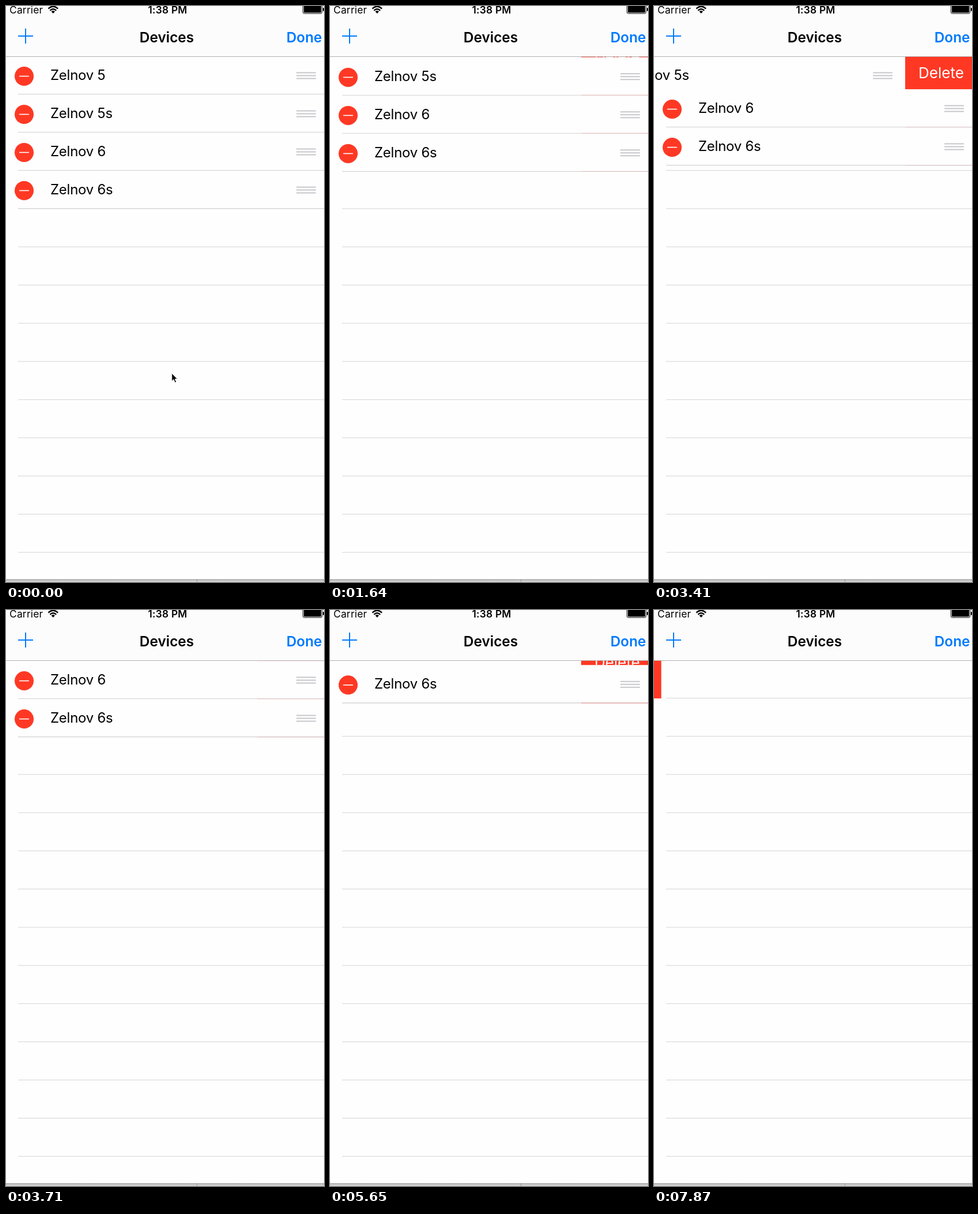
These frames come from a looping animation (552x997 px, 8 s). An HTML page:

```html
<!DOCTYPE html>
<html lang="en">
<head>
<meta charset="utf-8">
<title>Devices</title>
<style>
  html, body { margin: 0; width: 100%; height: 100%; overflow: hidden; background: #fefefe; }
  svg { display: block; width: 100vw; height: 100vh; }
  text { font-family: Inter, Roboto, sans-serif; white-space: pre; }
  .semi { font-weight: 600; }
  .status { font-size: 17.4px; letter-spacing: .2px; }
  .bar { font-size: 24.4px; }
  .label { font-size: 24px; letter-spacing: -.25px; }
</style>
</head>
<body>
<svg id="stage" viewBox="0 0 552 997">
  <defs>
    <linearGradient id="edge" x1="0" y1="0" x2="0" y2="1">
      <stop offset="0" stop-color="#a9a9a9"/>
      <stop offset="1" stop-color="#dedede"/>
    </linearGradient>
  </defs>
  <rect width="552" height="997" fill="#fefefe"/>
  <g id="lines"></g>
  <g id="rows"></g>

  <rect width="552" height="87" fill="#fcfcfc"/>
  <rect y="87" width="552" height="1" fill="#b2b2b4"/>
  <text class="status" x="6" y="13">Carrier</text>
  <g fill="none" stroke="#000" stroke-width="2.3">
    <path d="M73.4 4.6Q81.8 -3.2 90.2 4.6"/>
    <path d="M76.4 7.8Q81.8 2.6 87.2 7.8"/>
  </g>
  <path d="M78.6 9.6Q81.8 6.9 85 9.6L81.8 13Z"/>
  <text class="status semi" x="280.5" y="13" text-anchor="middle">1:38 PM</text>
  <rect x="515.5" y="-3" width="33" height="16" rx="2" fill="none" stroke="#000"/>
  <rect x="517" y="-2" width="30" height="13.5" rx="1"/>
  <rect x="550" y="3" width="2" height="6" rx="1"/>
  <path d="M21 52H47M34 39V65" stroke="#007aff" stroke-width="2"/>
  <text class="bar semi" x="279" y="63" text-anchor="middle">Devices</text>
  <text class="bar semi" x="548.5" y="63" text-anchor="end" fill="#007aff">Done</text>

  <rect y="992" width="552" height="5" fill="url(#edge)"/>
  <rect x="331" y="992" width="1" height="5" fill="#999"/>
  <path id="cursor" d="M287.8 635.5V649.5L291 646.6L293.4 652L295.8 651L293.4 645.8H297.6Z"
        stroke="#fff" stroke-width="1"/>
</svg>
<script>
const LOOP = 8000, STEP = 148.5;
const TOP = 87, ROW = 66, WIDTH = 562, SWIPE = 124;
const $ = id => document.getElementById(id);

// open / remove: tick at which each motion starts, then spring phase at that tick and its gain per tick
const devices = [
  { name: 'Zelnov 5',  open: [1, .2, 2.1],   remove: [10, 2.7, 2.7] },
  { name: 'Zelnov 5s', open: [15, .2, 2.1],  remove: [23, .64, 2.7] },
  { name: 'Zelnov 6',  open: [29, .25, 2.1], remove: [37, .9, 2.7] },
  { name: 'Zelnov 6s', open: [42, .05, 2.1], remove: [50, .3, 1.8] }
];

function add(parent, tag, attrs, text) {
  const el = document.createElementNS('http://www.w3.org/2000/svg', tag);
  for (const key in attrs) el.setAttribute(key, attrs[key]);
  if (text) el.textContent = text;
  return parent.appendChild(el);
}

function shift(el, x, y) {
  el.setAttribute('transform', `translate(${x} ${y})`);
}

for (let i = 0; i < 13; i++) {
  add($('lines'), 'rect', { x: 21, y: 152 + 66.1 * i, width: 531, height: 1, fill: '#d4d4d6' });
}

function makeRow({ name }) {
  const root = add($('rows'), 'g', {});
  const back = add(root, 'rect', { width: WIDTH, height: ROW, fill: '#fefefe' });
  const line = add(root, 'rect', { x: 21, y: 65, width: WIDTH - 21, height: 1, fill: '#d0d0d3' });
  const button = add(root, 'rect', { x: 436, width: WIDTH - 436, height: ROW, fill: '#ff3824' });
  const caption = add(root, 'text', { x: 498.5, 'text-anchor': 'middle', 'font-size': 26, fill: '#fff' }, 'Delete');
  const cell = add(root, 'g', {});
  add(cell, 'rect', { width: 560, height: 65, fill: '#fefefe' });
  add(cell, 'rect', { x: 21, y: 65, width: 539, height: 1, fill: '#d0d0d3' });
  add(cell, 'circle', { cx: 31.5, cy: 35.3, r: 16.5, fill: '#e8e8e8' });
  add(cell, 'circle', { cx: 31.5, cy: 34.5, r: 16.5, fill: '#ff3824' });
  const minus = add(cell, 'rect', { x: 23, y: 33.7, width: 17, height: 1.6, fill: '#fff' });
  add(cell, 'text', { class: 'label', x: 77, y: 41 }, name);
  for (const y of [27.4, 32.4, 37.4]) {
    add(cell, 'rect', { x: 504, y, width: 34, height: 2, rx: .6, fill: '#c7c7cc' });
  }
  return { root, button, caption, cell, minus };
}
const rows = devices.map(makeRow);

// Critically damped spring, 0 to 1
function spring(tick, [start, phase, gain]) {
  if (tick < start) return 0;
  const x = phase + gain * (tick - start);
  const p = 1 - (1 + x) * Math.exp(-x);
  return p > .998 ? 1 : p;
}

function render(ms) {
  const tick = Math.floor((ms % LOOP + 7) / STEP);
  let y = TOP;
  devices.forEach((device, i) => {
    const { root, button, caption, cell, minus } = rows[i];
    const opened = spring(tick, device.open);
    const removed = spring(tick, device.remove);
    const last = i === devices.length - 1;
    const height = last ? ROW : ROW * (1 - removed);
    root.style.display = removed > .99 ? 'none' : '';
    shift(root, last ? -WIDTH * removed : 0, y);
    shift(cell, -SWIPE * opened, 0);
    minus.setAttribute('transform', `rotate(${-90 * opened} 31.5 34.5)`);
    button.setAttribute('height', height);
    caption.setAttribute('y', height / 2 + 9);
    y += height;
  });
  $('cursor').style.display = tick < devices[0].remove[0] ? '' : 'none';
}

const began = performance.now();
function loop() {
  render(performance.now() - began);
  requestAnimationFrame(loop);
}
loop();
</script>
</body>
</html>
```
